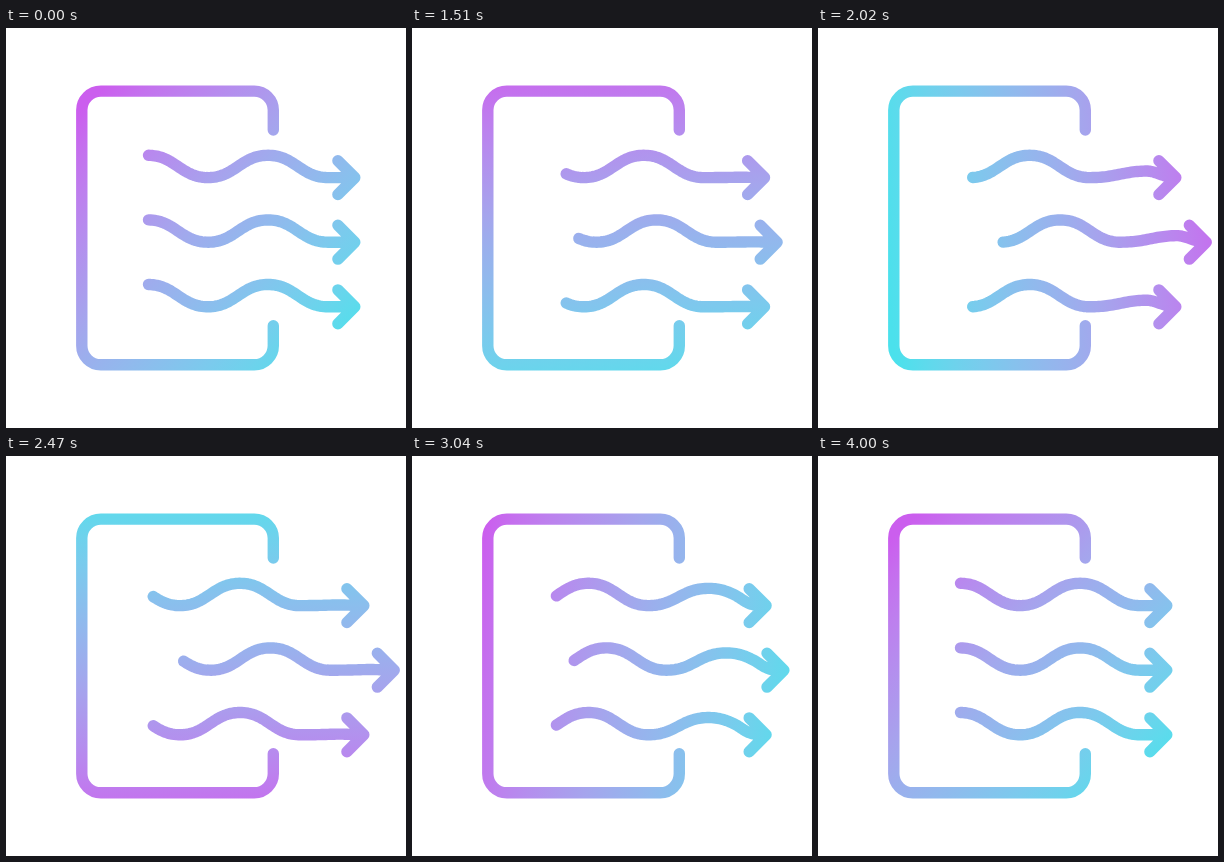
An HTML page with a canvas for the animation above (4030 ms loop, 400 by 400 pixels).

```html
<!DOCTYPE html>
<html lang="en">
<head>
<meta charset="utf-8">
<title>Air flow icon</title>
<style>
html, body { margin: 0; width: 100%; height: 100%; overflow: hidden; background: #fff; }
canvas { display: block; width: 400px; height: 400px; }
</style>
</head>
<body>
<canvas id="stage"></canvas>
<script>
const LOOP = 4030, HOLD = 1000, STEP = 30;
const TAIL = 142.5, TIP = 348.8, CREST = 262, PERIOD = 120, HEIGHT = 22.3;
const MAGENTA = [203, 94, 238], CYAN = [75, 225, 236];

const canvas = document.getElementById('stage');
const ctx = canvas.getContext('2d');
const ratio = window.devicePixelRatio || 1;
canvas.width = canvas.height = Math.round(400 * ratio);

// Smooth rise from 0 to 1 while v goes from a to b; power > 1 delays it
function ease(v, a, b, power = 1) {
  const u = Math.min(1, Math.max(0, (v - a) / (b - a)));
  return (u * u * (3 - 2 * u)) ** power;
}

// Height of the wave above its base line; crests flatten towards the tip
function lift(x, phase) {
  const n = Math.round((x - CREST - phase) / PERIOD);
  const crest = CREST + phase + n * PERIOD;
  const c = Math.cos((x - crest) / PERIOD * 2 * Math.PI);
  const bell = 0.5 + (1.15 * c - 0.15 * c ** 3) / 2;
  return HEIGHT * bell * (1 - ease(crest, CREST, CREST + 95)) * (1 - ease(x, TIP - 30, TIP));
}

function drawArrow(base, shift, phase, from) {
  const count = 100, arm = 16.9;
  ctx.beginPath();
  for (let i = 0; i <= count; i++) {
    const x = from + (TIP - from) * i / count;
    ctx.lineTo(x + shift, base - lift(x, phase));
  }
  ctx.moveTo(TIP - arm + shift, base - arm);
  ctx.lineTo(TIP + shift, base);
  ctx.lineTo(TIP - arm + shift, base + arm);
  ctx.stroke();
}

function drawBox() {
  const l = 75.8, r = 267.3, t = 63.1, b = 336.8, rad = 19;
  ctx.beginPath();
  ctx.moveTo(r, 102);
  ctx.arcTo(r, t, l, t, rad);
  ctx.arcTo(l, t, l, b, rad);
  ctx.arcTo(l, b, r, b, rad);
  ctx.arcTo(r, b, r, t, rad);
  ctx.lineTo(r, 297.8);
  ctx.stroke();
}

// Mix in linear light
function mix(u) {
  const rgb = MAGENTA.map((m, i) =>
    Math.round((m ** 2.2 * (1 - u) + CYAN[i] ** 2.2 * u) ** (1 / 2.2)));
  return `rgb(${rgb})`;
}

function paint(angle, cx) {
  const dx = 180 * Math.cos(angle), dy = 180 * Math.sin(angle);
  const g = ctx.createLinearGradient(cx - dx, 200 - dy, cx + dx, 200 + dy);
  for (let i = 0; i <= 12; i++) g.addColorStop(i / 12, mix(i / 12));
  return g;
}

function draw(ms) {
  const k = Math.max(0, Math.floor((ms % LOOP - HOLD) / STEP + 0.001));
  const push = ease(k, 0, 40) - ease(k, 40, 100);
  const phase = 1.5 * PERIOD * (ease(k, 0, 35) + ease(k, 28, 100, 1.3));
  const from = TAIL + 8.5 * ease(k, 0, 20) - 13.1 * ease(k, 20, 52) + 4.6 * ease(k, 52, 100);
  const angle = Math.PI * (0.25 + 2 * ease(k, 0, 84));

  ctx.setTransform(ratio, 0, 0, ratio, 0, 0);
  ctx.fillStyle = '#fff';
  ctx.fillRect(0, 0, 400, 400);
  ctx.lineWidth = 11.4;
  ctx.lineCap = ctx.lineJoin = 'round';
  ctx.strokeStyle = paint(angle, 212 + 35 * push);

  drawBox();
  for (let i = 0; i < 3; i++) {
    const reach = i === 1 ? 42 : 9.6;
    drawArrow(149.6 + 64.6 * i, reach * push, phase, from);
  }
}

function tick(now) {
  draw(now);
  requestAnimationFrame(tick);
}
draw(0);
requestAnimationFrame(tick);
</script>
</body>
</html>
```
